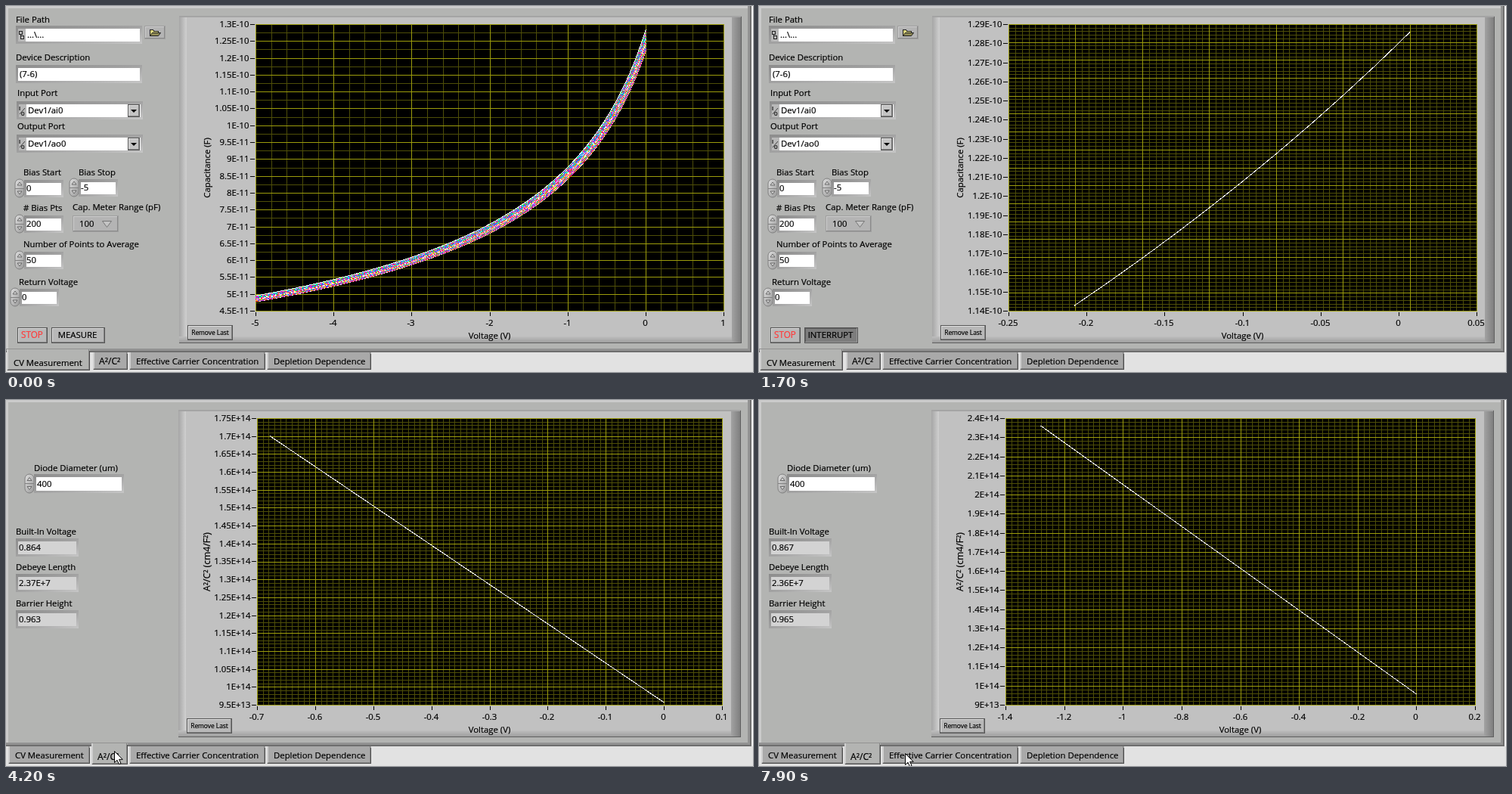
Write an HTML page that moves like this. It is 988 px wide and 484 px high and loops after 8000 ms.

```html
<!DOCTYPE html>
<html lang="en">
<head>
<meta charset="utf-8">
<title>CV measurement panel</title>
<style>
  html, body { margin: 0; width: 100%; height: 100%; overflow: hidden; background: #e2e2e2; }
  svg { display: block; width: 988px; height: 484px; shape-rendering: crispEdges; }
  text {
    font: 11.35px "Open Sans", "Noto Sans", sans-serif; white-space: pre;
    color: #000; fill: currentColor; stroke: currentColor; stroke-width: .2px;
  }
  .sup { font-size: 12.2px; }
  .tiny { font-size: 8.4px; }
  .icon { font-size: 8px; }
  .stop { font-size: 11.7px; color: #ff3c3c; }
  .mid { text-anchor: middle; }
  .end { text-anchor: end; }
  .smooth { shape-rendering: auto; }
</style>
</head>
<body>
<svg viewBox="0 0 988 484">
  <defs>
    <linearGradient id="sunk" x2="1" y2="1">
      <stop offset="0" stop-color="#8c8c8c"/><stop offset=".5" stop-color="#a2a2a2"/><stop offset="1" stop-color="#c6c6c6"/>
    </linearGradient>
    <linearGradient id="knob" x2="1" y2="1">
      <stop offset="0" stop-color="#e0e0e0"/><stop offset="1" stop-color="#989898"/>
    </linearGradient>
    <linearGradient id="rimL"><stop offset="0" stop-color="#a6a6a6"/><stop offset="1" stop-color="#d0d0d0"/></linearGradient>
    <linearGradient id="rimR"><stop offset="0" stop-color="#a2a2a2"/><stop offset="1" stop-color="#7c7c7c"/></linearGradient>
    <linearGradient id="rimB" x2="0" y2="1"><stop offset="0" stop-color="#bebebe"/><stop offset="1" stop-color="#9a9a9a"/></linearGradient>
  </defs>
  <g id="frame"></g>
  <g id="tabs"></g>
  <g id="panes"></g>
  <g id="plot"></g>
  <path id="cursor" class="smooth" d="M.5 .5V15.5L4 12.2L6.5 17.7L9 16.6L6.6 11.3H11.2Z" fill="#fff" stroke="#000"/>
</svg>
<script>
const LOOP = 8000, FRAME = 100, SWITCH = 3700;
const TOP = 24, BOTTOM = 403;
const STEP_V = 5 / 199;
const $ = id => document.getElementById(id);

// Basic parts
const rect = (x, y, w, h, fill, more = '') =>
  `<rect x="${x}" y="${y}" width="${w}" height="${h}" fill="${fill}" ${more}/>`;
const path = (d, stroke, fill = 'none', more = '') =>
  `<path d="${d}" stroke="${stroke}" fill="${fill}" ${more}/>`;
const text = (x, mid, s, cls = '', more = '') =>
  `<text x="${x}" y="${mid + 4}" class="${cls}" ${more}>${s}</text>`;

const sunken = (x, y, w, h, fill = '#fff') =>
  rect(x, y, w, h, 'url(#sunk)') + rect(x + 3, y + 4, w - 6, h - 7, fill);

function raised(x, y, w, h, { fill = '#b8b8b8', light = '#e0e0e0', dark = '#808080', edge = '#555' } = {}) {
  return rect(x, y, w, h, edge) + rect(x + 1, y + 1, w - 2, h - 2, dark) +
    rect(x + 1, y + 1, w - 3, h - 3, light) + rect(x + 2, y + 2, w - 4, h - 4, fill);
}
const SOFT = { fill: '#b4b4b4', light: '#cccccc', dark: '#8a8a8a', edge: '#a0a0a0' };
const PRESSED = { fill: '#7d7d7d', light: '#5c5c5c', dark: '#989898' };

function spinner(x, y, h = 24) {
  const c = x + 6, m = y + h / 2;
  return rect(x, y, 12, h, 'url(#knob)', 'rx="6" stroke="#808080" class="smooth"') +
    path(`M${x} ${m}h12`, '#808080') +
    path(`M${c - 3} ${m - 4}l3 -4l3 4zM${c - 3} ${m + 4}l3 4l3 -4z`, '#555', '#d0d0d0', 'class="smooth" stroke-width=".8"');
}

const numeric = (x, y, w, value) =>
  spinner(x - 13, y - 1) + sunken(x - 1, y, w, 23) + text(x + 2, y + 11, value);

function port(y, name) {
  return sunken(14, y, 167, 24) + rect(17, y + 4, 10, 17, '#b8b8b8') +
    text(17, y + 8, 'I', 'icon') + text(20, y + 15, '0', 'icon') +
    path(`M18 ${y + 17}l7 -8`, '#222', 'none', 'class="smooth" stroke-width=".8"') + text(29, y + 12, name) +
    raised(161, y + 4, 16, 17, { fill: '#c4c4c4' }) + path(`M165 ${y + 11}h8l-4 4z`, 'none', '#000', 'class="smooth"');
}

function frame(tab) {
  const panel = rect(229, 14, 744, 432, '#c1c1c1') + rect(229, 14, 10, 432, 'url(#rimL)') +
    rect(229, 437, 744, 9, 'url(#rimB)') + rect(960, 14, 13, 432, 'url(#rimR)') +
    rect(229, 13, 744, 2, '#a4a4a4') + path('M229 445.5H972.5V14', '#606060');
  return rect(0, 0, 986, 458, '#6e6e6e') + rect(0, 0, 984, 456, '#929292') + rect(0, 0, 981, 453, '#cbcbcb') +
    rect(3, 3, 978, 450, '#b3b4b2') + rect(986, 0, 2, 458, '#f2f2f2') +
    `<g transform="translate(${-tab} 0)">${panel}</g>`;
}

const TABS = [
  { name: 'CV Measurement', x: 3, w: 108, tx: 12 },
  { name: 'A²/C²', x: 115, w: 46, tx: 123, cls: 'sup' },
  { name: 'Effective Carrier Concentration', x: 163, w: 180, tx: 172 },
  { name: 'Depletion Dependence', x: 345, w: 138, tx: 354 }
];

function tabBar(active) {
  return TABS.map((t, i) => {
    const on = i === active, grow = on ? 2 : 0;
    const x = t.x - grow, w = t.w + grow, y = on ? 454 : 458, b = on ? 482 : 481;
    return rect(x, y, w, b - y, on ? '#b3b4b2' : '#a9a9a9') +
      path(`M${x + .5} ${y}V${b - 1}M${x + 1.5} ${y}V${b - 2}`, '#cfcfcf') +
      path(`M${x + 2} ${b - 1.5}H${x + w - 1.5}V${y}`, '#858585') +
      path(`M${x + 1} ${b - .5}H${x + w - .5}V${y + 2}`, '#4e4e4e') +
      text(t.tx - grow, on ? 471.5 : 470, t.name, t.cls);
  }).join('');
}

function measurePane(running) {
  return text(13, 18, 'File Path') + sunken(13, 26, 167, 24) + rect(16, 30, 10, 17, '#b8b8b8') +
    path('M17.5 33.5h4v4h-4zM19.5 39.5h4v4h-4zM19.5 37v3', '#222') + text(28, 38, '...\\...') +
    raised(183, 26, 28, 18, SOFT) +
    path('M190.5 39.5V31.5h4l1 1.5h6v2', '#222', '#d9d37c') +
    path('M190.5 39.5l3 -4h11l-3 4z', '#222', '#8f8a55', 'class="smooth"') +
    text(13, 68, 'Device Description') + sunken(13, 78, 167, 24) + text(18, 90, '(7-6)') +
    text(15, 115, 'Input Port') + port(126, 'Dev1/ai0') +
    text(15, 159, 'Output Port') + port(170, 'Dev1/ao0') +
    text(23, 220, 'Bias Start') + numeric(25, 230, 52, '0') +
    text(96, 220, 'Bias Stop') + numeric(97, 229, 52, '-5') +
    text(23, 267, '# Bias Pts') + numeric(25, 277, 52, '200') +
    text(88, 266, 'Cap. Meter Range (pF)') + raised(88, 277, 61, 22, SOFT) + text(97, 288, '100') +
    path('M127.5 284.5h12l-6 8z', '#777', '#c4c4c4', 'class="smooth"') +
    text(23, 315, 'Number of Points to Average') + numeric(25, 325, 52, '50') +
    text(17, 365, 'Return Voltage') + numeric(19, 374, 52, '0') +
    raised(15, 425, 40, 21) + text(34.5, 435, 'STOP', 'mid stop') +
    raised(60, 425, 71, 21, running ? PRESSED : {}) +
    text(94.5, 435, running ? 'INTERRUPT' : 'MEASURE', 'mid');
}

function fitPane(t) {
  const [volt, len, height] = t < 4700 ? ['0.864', '2.37', '0.963'] :
    t < 5000 ? ['0.866', '2.36', '0.965'] :
    t < 6000 ? ['0.868', '2.36', '0.967'] : ['0.867', '2.36', '0.965'];
  const readout = (y, name, value) =>
    text(13, y, name) + sunken(13, y + 9, 83, 24, '#d3d3d3') + text(17, y + 21, value);
  return text(37, 90, 'Diode Diameter (um)') + spinner(25, 98, 25) + sunken(37, 98, 119, 25) + text(41, 111, '400') +
    readout(174, 'Built-In Voltage', volt) + readout(221, 'Debeye Length', len + 'E+7') +
    readout(269, 'Barrier Height', height);
}

// Diode model: A²/C² grows linearly with reverse bias (units of 1E14 and 1E-11)
const invSquare = v => .957 - 1.097 * v;
const capacitance = v => 12.858 * Math.sqrt(.957 / invSquare(v));
// Relative spread of the earlier sweeps, widest near zero bias
const spread = v => .0336 + .0155 / invSquare(v);

// Autoscaled axis with a 1-2-5 step, at most `limit` steps across the data
function axis(lo, hi, limit) {
  let mag = 10 ** Math.floor(Math.log10((hi - lo) / limit)), lead;
  do {
    lead = [1, 2, 5, 10].find(k => (hi - lo) / (k * mag) <= limit);
    if (!lead) mag *= 10;
  } while (!lead);
  const step = lead * mag;
  const a = Math.floor(lo / step + 1e-6), b = Math.ceil(hi / step - 1e-6);
  const ticks = Array.from({ length: b - a + 1 }, (_, i) => (a + i) * step);
  return { lo: a * step, hi: b * step, ticks, lead };
}

function axes(steps, tab) {
  const vMin = steps ? -steps * STEP_V : -5;
  const f = tab ? invSquare : capacitance, ends = [f(0), f(vMin)];
  if (!steps) ends[1] *= 1 - spread(vMin);
  return { x: axis(vMin, .0001, 8), y: axis(Math.min(...ends), Math.max(...ends), 18) };
}

const plain = v => String(+v.toPrecision(6) || 0);
const sci = (v, exp) => String((+(v * 10 ** exp).toPrecision(4)).toExponential()).toUpperCase();

const pos = (ax, v, a, b) => a + (v - ax.lo) / (ax.hi - ax.lo) * (b - a);

function gridLines(ax, parts, a, b, toLine) {
  let d = '';
  const n = (ax.ticks.length - 1) * parts;
  for (let i = 0; i <= n; i++) d += toLine(Math.round(a + i / n * (b - a)) + .5);
  return d;
}

function curve(f, count, sx, sy) {
  let d = '';
  for (let i = 0; i <= count; i++) {
    const v = -i * STEP_V;
    d += `${d ? 'L' : 'M'}${sx(v).toFixed(2)} ${sy(f(v)).toFixed(2)}`;
  }
  return d;
}

// Stack of earlier sweeps, drifting slightly in capacitance
function sweeps(sx, sy) {
  const colors = ['#ff20b0', '#00d8ff', '#3050ff', '#20e020', '#ffd820', '#ff3030', '#a040ff', '#ffffff'];
  let seed = 7, out = '';
  const rnd = () => (seed = seed * 16807 % 2147483647) / 2147483647;
  const color = () => colors[Math.floor(rnd() * colors.length)];
  const count = 24;
  for (let k = count; k >= 0; k--) {
    const d = curve(v => capacitance(v) * (1 - k / count * spread(v)), 199, sx, sy);
    if (k % count === 0) {
      out += path(d, '#fff');
      continue;
    }
    out += path(d, color());
    for (let j = 0; j < 2; j++) {
      const dash = [5, 9, 4, 12].map(n => (2 + rnd() * n).toFixed(1)).join(' ');
      out += path(d, color(), 'none', `stroke-dasharray="${dash}"`);
    }
  }
  return out;
}

function plot(steps, labelSteps, tab, empty) {
  const { x, y } = axes(steps, tab), shown = axes(labelSteps, tab);
  const exp = tab ? 14 : -11;
  const wide = y.ticks.some(v => sci(v, exp).length > 7);
  const left = tab ? (wide ? 332 : 326) : 330, right = tab ? 947 : 949;
  const mid = (left + right) / 2;
  const sx = v => pos(x, v, left, right) + .5, sy = v => pos(y, v, BOTTOM, TOP) + .5;
  const vert = p => `M${p} ${TOP}V${BOTTOM + 1}`, horiz = p => `M${left} ${p}H${right + 1}`;
  const lines = (nx, ny) => gridLines(x, nx, left, right, vert) + gridLines(y, ny, BOTTOM, TOP, horiz);
  const minor = steps ? lines(10, y.lead === 2 ? 4 : 5) : lines(5, 2);
  let out = rect(left, TOP, right - left + 1, BOTTOM - TOP + 1, '#000') +
    path(minor, '#4e4e08') + path(lines(1, 1), '#9c9c0c');

  if (steps) out += path(curve(tab ? invSquare : capacitance, steps, sx, sy), '#fff');
  else if (!empty) out += sweeps(sx, sy);

  for (const v of shown.x.ticks) {
    const p = Math.round(pos(shown.x, v, left, right));
    out += path(`M${p + .5} ${BOTTOM + 2}v5`, '#000') + text(p - .5, 419, plain(v), 'mid');
  }
  for (const v of shown.y.ticks) {
    const p = Math.round(pos(shown.y, v, BOTTOM, TOP));
    out += path(`M${left - 7} ${p + .5}h6`, '#000') + text(left - 8.5, p, sci(v, exp), 'end');
  }
  const name = tab ? 'A²/C² (cm4/F²)' : 'Capacitance (F)';
  out += text(0, 0, name, tab ? 'mid sup' : 'mid', 'transform="translate(266 214) rotate(-90)"');
  out += text(mid, 436, 'Voltage (V)', 'mid');
  const bx = 240 - tab, by = 422 - tab;
  return out + raised(bx, by, 60, 20) + text(bx + 30, by + 9.3, 'Remove Last', 'mid tiny');
}

// Timeline: [time, value...]
const STEPS = [[100, 0], [950, 6], [1690, 10], [2500, 18], [4100, 27], [5250, 37], [7200, 49], [7800, 51], [8000, 51.5]];
const POINTER = [[3300, 152, 478], [3600, 146, 466], [3700, 143, 464], [6200, 143, 464],
  [6300, 144, 465], [7200, 173, 467], [7900, 193, 467]];

function at(keys, t, k = 1) {
  if (t <= keys[0][0]) return keys[0][k];
  const i = keys.findIndex(key => key[0] > t);
  if (i < 0) return keys[keys.length - 1][k];
  const a = keys[i - 1], b = keys[i];
  return a[k] + (b[k] - a[k]) * (t - a[0]) / (b[0] - a[0]);
}
const stepsAt = t => Math.floor(at(STEPS, t) + 1e-6);

const drawn = {};
function set(id, key, make) {
  if (drawn[id] === key) return;
  drawn[id] = key;
  $(id).innerHTML = make();
}

function render(time) {
  const t = Math.floor(time % LOOP / FRAME) * FRAME;
  const tab = t < SWITCH ? 0 : 1, running = t >= 100;
  // Axis labels refresh slightly after the plot area
  const steps = stepsAt(t), labelSteps = stepsAt(t - 50);
  const pane = tab ? fitPane(t) : measurePane(running);
  set('frame', tab, () => frame(tab));
  set('tabs', tab, () => tabBar(tab));
  set('panes', pane, () => pane);
  set('plot', [steps, labelSteps, tab, running].join(), () => plot(steps, labelSteps, tab, running));
  $('cursor').setAttribute('visibility', t < POINTER[0][0] ? 'hidden' : 'visible');
  $('cursor').setAttribute('transform', `translate(${Math.round(at(POINTER, t))} ${Math.round(at(POINTER, t, 2))})`);
}

const start = performance.now();
function tick() {
  render(performance.now() - start);
  requestAnimationFrame(tick);
}
tick();
</script>
</body>
</html>
```
